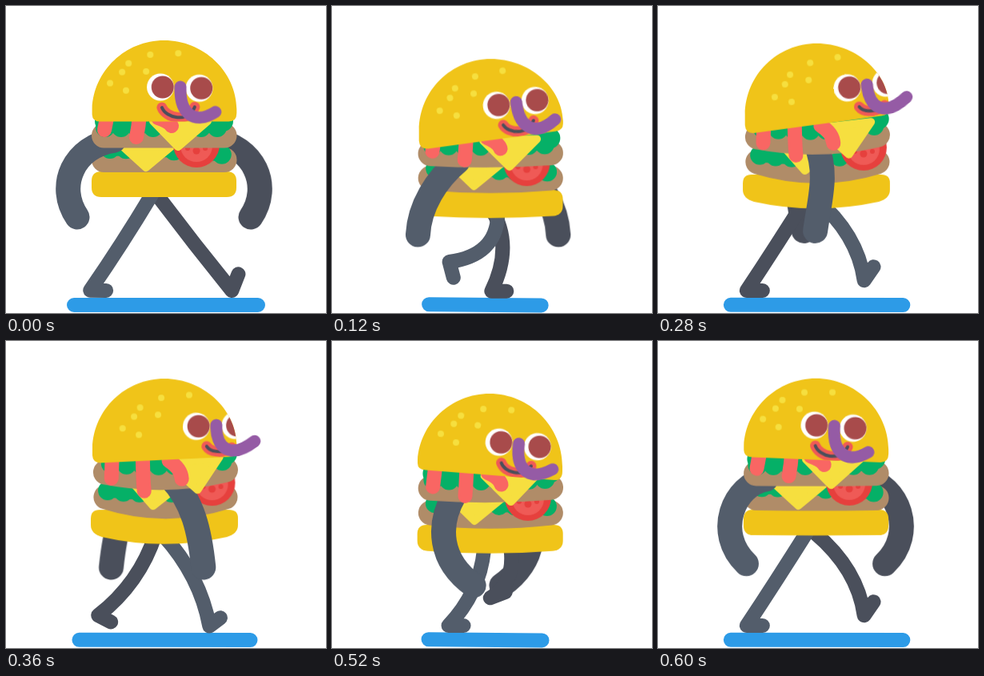
An HTML page without scripts for the animation above (640 ms loop, 400 by 384 pixels).

```html
<!DOCTYPE html>
<html lang="en">
<head>
<meta charset="utf-8">
<title>Walking burger</title>
<style>
:root {
  --sine: cubic-bezier(.364, 0, .636, 1);
  --light: #535d6b;
  --dark: #4a4f5b;
  --bun: #f0c419;
  --cheese: #f6df3f;
  --green: #05b067;
  --patty: #b08c68;
  --sauce: #f96663;
}
html, body { margin: 0; width: 100%; height: 100%; overflow: hidden; background: #fff; }
svg { display: block; width: 100%; height: 100%; }
path { fill: none; stroke-linecap: round; stroke-linejoin: round; }

/* one step is 320 ms: the body bobs once per step and turns once per two steps */
.bob, .ground, .turn, .slide, .tilt, .dome { animation: .32s var(--sine) infinite alternate; }
.bob, .ground { animation-duration: .16s; }
.turn, .slide { animation-delay: -631ms; }
.tilt, .dome { animation-delay: -440ms; }
.bob { animation-name: drop; }
.ground, .turn { animation-name: morph; }
.slide { animation-name: slide; }
.tilt { animation-name: tilt; transform-origin: 197px 101px; }
.dome { animation-name: dome; fill: var(--bun); }

.leg { stroke-width: 18; animation: leg .64s linear infinite; }
.leg.light { animation-delay: -.32s; }
.arm { stroke-width: 31; animation: arm .64s linear infinite; }
.light { stroke: var(--light); }
.dark { stroke: var(--dark); }

.ground { stroke: #2d9be7; stroke-width: 18; }
.base { fill: var(--bun); }
.patty { stroke: var(--patty); stroke-width: 31; }
.leaf { stroke: var(--green); stroke-width: 17; }
.tall { stroke-width: 26; transform: translateY(-8px); }
.frill { stroke: var(--green); stroke-width: 24; stroke-dasharray: 0 20; }
.cheese { fill: var(--cheese); stroke: var(--cheese); stroke-width: 10; }
.sauce { stroke: var(--sauce); stroke-width: 18; }
.seeds { stroke: var(--cheese); stroke-width: 8; }
.lips { stroke: #f05a56; stroke-width: 13; }
.smile { stroke: var(--dark); stroke-width: 4; }
.nose { stroke: #955ba5; stroke-width: 15; }

@keyframes drop { to { transform: translateY(27px); } }
@keyframes morph { to { d: var(--to); } }
@keyframes slide { to { transform: translate(var(--x), var(--y, 0px)); } }
@keyframes tilt {
  from { transform: rotate(-10.7deg); }
  to { transform: rotate(5.5deg); }
}
@keyframes dome {
  from { d: path("M109 148 L109 133 C109 83 149 43 199 43 C245 43 287 76 289 118 L289 121 Q289 129 280 130.5 L121 158 Q110 159 109 148 Z"); }
  to { d: path("M107 130 L107 126 C110 80 149 43 197 43 C247 43 288 84 288 134 L288 140 Q288 152 277 151 L117 138.5 Q107 138 107 130 Z"); }
}
/* hip, knee, heel, toe */
@keyframes leg {
  0%, 100% { d: path("M190 238 Q235 298 283 356 L291 335"); }
  12.5% { d: path("M203 248 Q250 290 227 357 L246 357"); }
  31.25% { d: path("M190 262 Q185 315 146 356 L165 356"); }
  43.75% { d: path("M187 238 Q148 300 111 356 L131 356"); }
  50% { d: path("M182 236 Q145 297 105 356 L125 356"); }
  62.5% { d: path("M191 248 Q188 308 125 331 L137 347"); }
  68.75% { d: path("M207 262 Q205 312 146 320 L151 340"); }
  81.25% { d: path("M224 262 Q228 305 197 321 L216 314"); }
  93.75% { d: path("M196 240 Q250 285 257 343 L269 326"); }
}
/* shoulder, two bends, hand */
@keyframes arm {
  0%, 100% { d: path("M135 168 C85 175 62 225 89 264"); }
  12.5% { d: path("M140 171 C100 181 83 221 88 256"); }
  31.25% { d: path("M190 172 C190 217 160 239 145 276"); }
  56.25% { d: path("M205 166 C235 196 243 236 247 279"); }
  68.75% { d: path("M181 172 C180 212 196 252 234 276"); }
  81.25% { d: path("M153 170 C132 207 134 252 178 283"); }
  93.75% { d: path("M135 169 C95 176 70 236 111 275"); }
}
</style>
</head>
<body>
<svg viewBox="0 0 400 384">
  <clipPath id="head"><path class="dome"/></clipPath>

  <path class="ground" d="M85 374 L315 374" style="--to:path('M127 373 L253 374.5')"/>
  <!-- the far arm mirrors the near one -->
  <g class="bob">
    <g class="slide" style="--x:-17px">
      <g transform="translate(395) scale(-1 1)"><path class="arm dark"/></g>
    </g>
  </g>
  <path class="leg dark"/>
  <path class="leg light"/>

  <g class="bob">
    <!-- lower half -->
    <path class="turn base" d="M119 207 Q197 207 276 207 Q288 207 288 219 L288 227 Q288 239 276 239 Q197 239 119 239 Q107 239 107 227 L107 219 Q107 207 119 207 Z"
      style="--to:path('M117 207 Q197 207 279 207 Q290 207 290 217 L290 226 Q290 237 276 241 Q197 259 120 241 Q106 237 106 226 L106 218 Q106 207 117 207 Z')"/>
    <path class="turn patty" d="M122.5 192.5 Q197 192.5 273 192.5" style="--to:path('M125 191 Q200 215 274 191')"/>
    <g style="--to:path('M127 183 Q195 191 272 180')">
      <path class="turn leaf" d="M130 179 Q200 179 271 186"/>
      <path class="turn frill" d="M130 179 Q200 179 271 186"/>
    </g>
    <path class="turn cheese" d="M142 172 L211 172 L175 202 Z" style="--to:path('M158 172 L222 172 L184 202 Z')"/>
    <g class="slide" style="--x:20px">
      <circle cx="238" cy="173" r="29" fill="#e6403d"/>
      <circle cx="238" cy="175" r="20" fill="#ef5a56"/>
      <g fill="#e6403d">
        <circle cx="238" cy="181" r="4.5"/>
        <circle cx="227" cy="178" r="3"/>
        <circle cx="249" cy="178" r="3"/>
      </g>
    </g>

    <path class="arm light"/>

    <!-- upper half -->
    <path class="turn patty" d="M122.5 162 Q197 162 273 162" style="--to:path('M124.5 160 Q200 175 274.5 157')"/>
    <g style="--to:path('M131 149 Q200 156 276 145')">
      <path class="turn leaf tall" d="M124 152 Q197 152 271 152"/>
      <path class="turn frill" d="M124 152 Q197 152 271 152"/>
    </g>
    <path class="turn cheese" d="M184 144 L252 144 L215 176 Z" style="--to:path('M203 149 L267 141 L240 182 Z')"/>
    <g class="sauce">
      <path class="turn" d="M127 135 L123 155" style="--to:path('M133 135 L132 168')"/>
      <path class="turn" d="M167 135 Q166 150 163 164" style="--to:path('M171 135 Q171 165 173 184')"/>
      <path class="turn" d="M190 140 Q204 145 207 150" style="--to:path('M204 146 Q219 155 220 169')"/>
    </g>
    <path class="dome"/>

    <!-- face -->
    <g clip-path="url(#head)">
      <g class="tilt">
        <path class="seeds slide" style="--x:16px;--y:6px" d="M180 61h.01M215 59h.01M153 72h.01M145 83h.01M175 82h.01M130 97h.01M150 106h.01"/>
        <g class="slide" style="--x:46px;--y:3px">
          <g style="--to:path('M205 127 C209 134 222 137 236 130')">
            <path class="turn lips" d="M195 127 C200 140 228 147 236 126"/>
            <path class="turn smile" d="M195 127 C200 140 228 147 236 126"/>
          </g>
          <g fill="#fff"><circle cx="193" cy="101.5" r="17"/><circle cx="241.5" cy="102.5" r="17"/></g>
          <g fill="#a84b4b"><circle cx="195.7" cy="101.5" r="14"/><circle cx="244.2" cy="102.5" r="14"/></g>
        </g>
      </g>
    </g>
    <g class="tilt">
      <g class="slide" style="--x:46px;--y:3px">
        <path class="turn nose" d="M218 101 C217 135 236 149 262 132" style="--to:path('M218 101 C216 128 232 146 265 123')"/>
      </g>
    </g>
  </g>
</svg>
</body>
</html>
```
